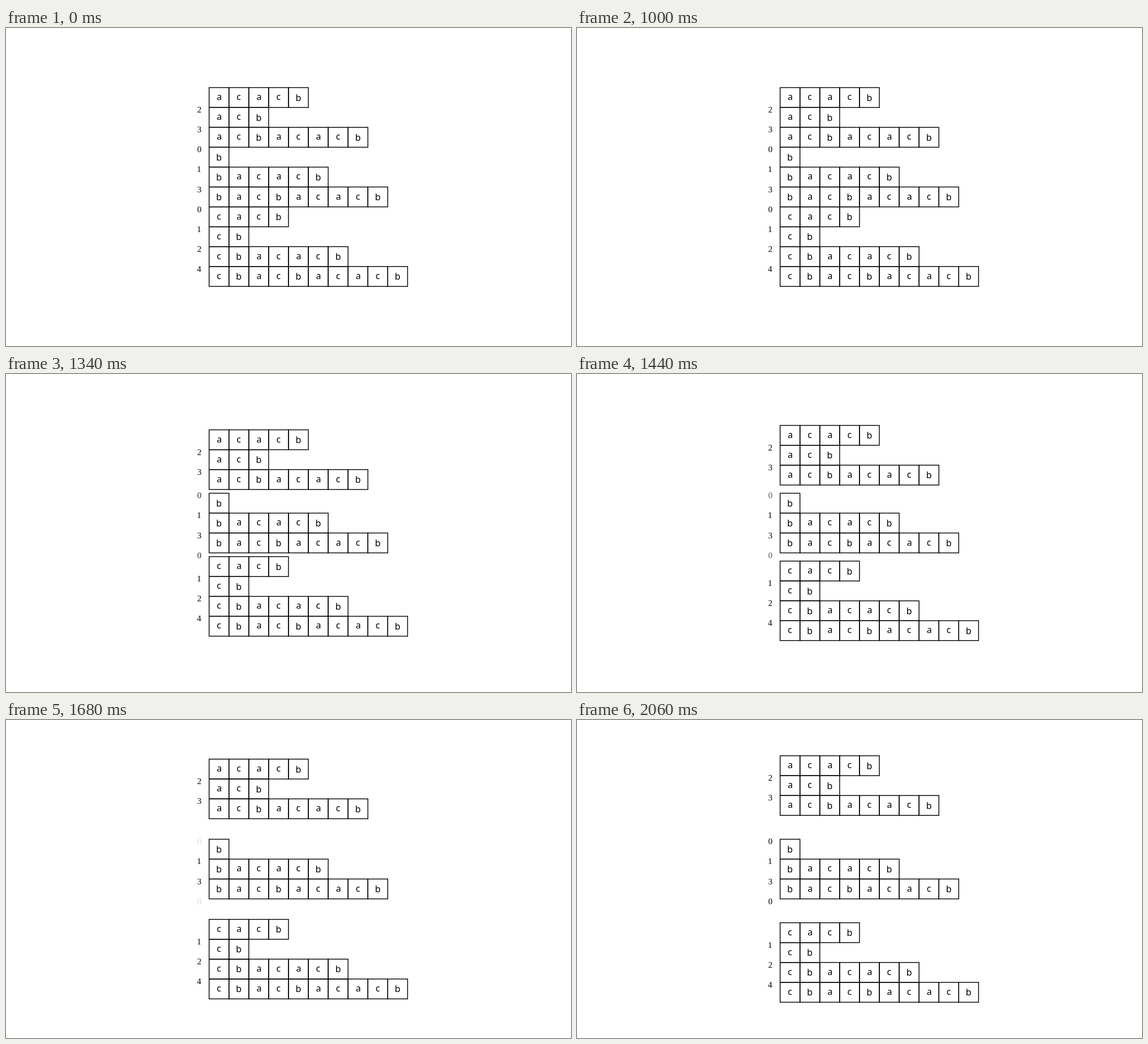
An HTML page with a canvas for the animation above (3000 ms loop, 998 by 561 pixels).

```html
<!DOCTYPE html>
<html lang="en">
<head>
<meta charset="utf-8">
<style>
  html, body { margin: 0; width: 100%; height: 100%; overflow: hidden; background: #fff; }
  canvas { display: block; }
</style>
</head>
<body>
<canvas id="stage" width="998" height="561"></canvas>
<script>
const ctx = document.getElementById('stage').getContext('2d');

const UNIT = 561 / 8;
const CELL = UNIT / 2;
const LEFT = 499 + UNIT / 2 - 5 * CELL;
const TOP = 280.5 - 5 * CELL;
const GAP = 0.6 * UNIT;
const LOOP = 3000;

const rows = ['acacb', 'acb', 'acbacacb', 'b', 'bacacb', 'bacbacacb',
  'cacb', 'cb', 'cbacacb', 'cbacbacacb'];
const shared = [2, 3, 0, 1, 3, 0, 1, 2, 4];
const groupShift = { a: -1, b: 0, c: 1 };

const sigmoid = x => 1 / (1 + Math.exp(-x));

function smooth(p) {
  const t = Math.min(1, Math.max(0, p));
  const edge = sigmoid(-5);
  return (sigmoid(10 * (t - 0.5)) - edge) / (1 - 2 * edge);
}

// Centres the ink of a glyph on the given point.
function glyph(text, x, y) {
  const m = ctx.measureText(text);
  const dx = (m.actualBoundingBoxLeft - m.actualBoundingBoxRight) / 2;
  const dy = (m.actualBoundingBoxAscent - m.actualBoundingBoxDescent) / 2;
  ctx.fillText(text, x + dx, y + dy);
}

function drawRow(word, y) {
  ctx.font = '16px "Noto Sans", "Open Sans", sans-serif';
  [...word].forEach((letter, i) => {
    const x = LEFT + i * CELL;
    ctx.strokeRect(x, y, CELL, CELL);
    glyph(letter, x + CELL / 2, y + CELL / 2);
  });
}

function drawCount(n, y, alpha) {
  ctx.font = '15px "Liberation Serif", serif';
  ctx.globalAlpha = alpha;
  glyph(String(n), LEFT - CELL / 2, y);
  ctx.globalAlpha = 1;
}

function draw(time) {
  const split = smooth((time - 1003) / 1000);
  ctx.fillStyle = '#fff';
  ctx.fillRect(0, 0, 998, 561);
  ctx.fillStyle = ctx.strokeStyle = '#000';
  ctx.lineWidth = 1.4;

  rows.forEach((word, i) => {
    const shift = groupShift[word[0]] * GAP * split;
    const y = TOP + i * CELL + shift;
    drawRow(word, y);
    if (i === rows.length - 1) return;
    const n = shared[i];
    const bottom = y + CELL + 4;
    if (n) drawCount(n, bottom, 1);
    else drawCount(n, bottom - shift, 1 - split);
  });
}

const start = performance.now();

function tick() {
  const time = (performance.now() - start) % LOOP;
  draw(Math.floor(time / 20) * 20);
  requestAnimationFrame(tick);
}
tick();
</script>
</body>
</html>
```
